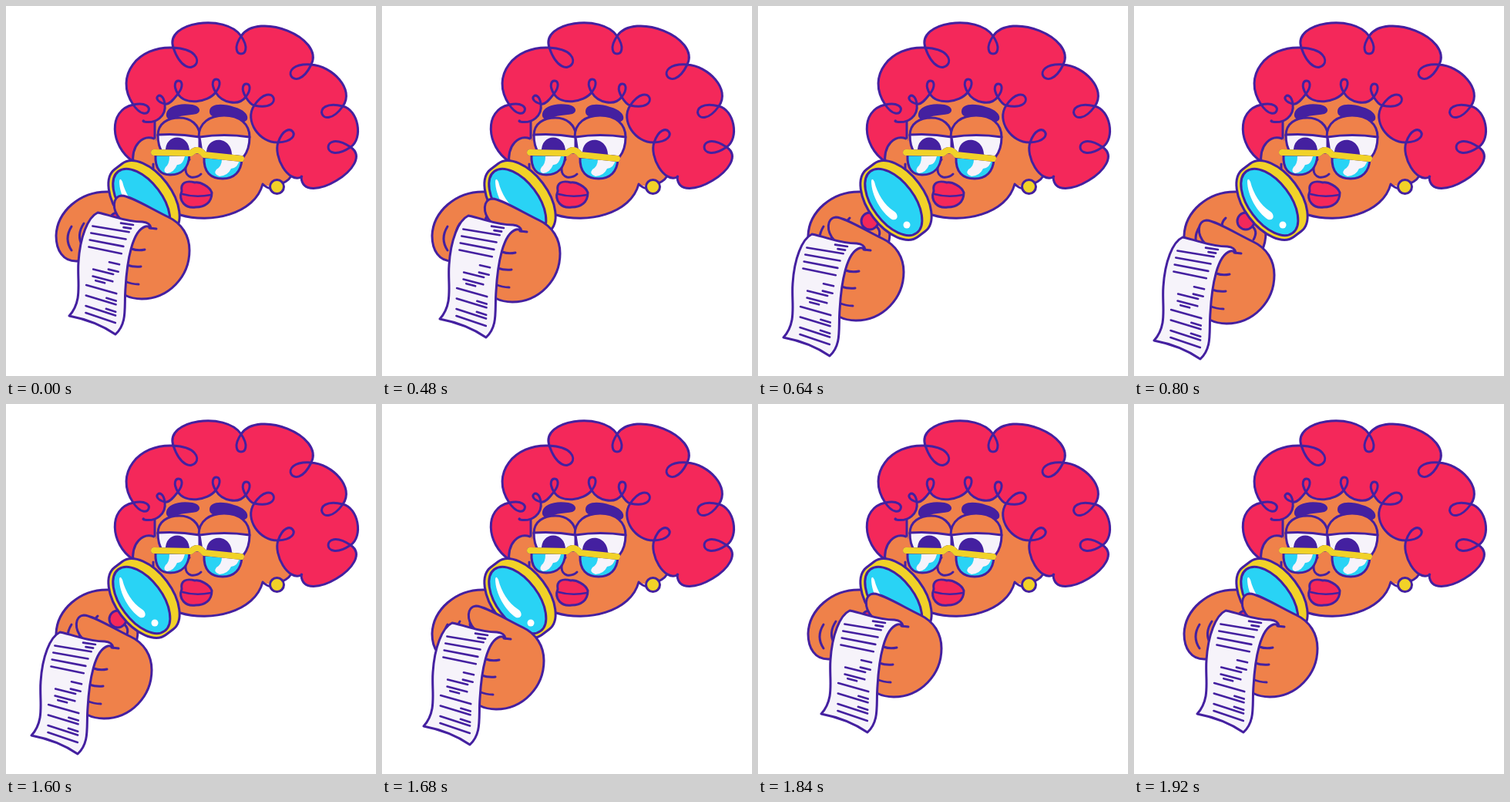
These frames come from a looping animation (480x480 px, 2.24 s). An HTML page:

```html
<!DOCTYPE html>
<html lang="en">
<head>
<meta charset="utf-8">
<title>Reading a receipt</title>
<style>
  html, body { margin: 0; width: 100%; height: 100%; overflow: hidden; background: #fff; }
  svg { display: block; width: 100%; height: 100%; }
  .ink { fill: none; }
  .skin { fill: #ef814a; }
  .hair { fill: #f4285a; }
  .gold { fill: #f1d228; }
  .glass { fill: #29d3f5; }
  .paper { fill: #f6f3fa; }
  .white { fill: #fff; }
  .dark { fill: #4420a0; }
  .flat { stroke: none; }
</style>
</head>
<body>
<svg viewBox="0 0 480 480" stroke="#4420a0" stroke-width="3" stroke-linecap="round" stroke-linejoin="round">
  <g id="head">
    <path class="hair flat" d="M160 132H194V176L164 198Z"/>
    <path class="skin flat" d="M192 110H322L345 165L372 216C368 230 345 238 333 231C325 272 265 283 226 271L192 215Z"/>
    <path class="ink" d="M193 146V174M226 271C265 283 323 270 333 231Q338 236 344 237M358 230Q369 226 371 217"/>
    <path class="hair" id="curls"/>
    <path class="skin flat" d="M194 172C178 167 162 179 165 206L200 225Z"/>
    <path class="ink" d="M192 172C178 167 162 179 165 206M191 205V214"/>
    <circle class="gold" cx="351.500" cy="234.500" r="9"/>

    <path class="dark flat" d="M208 140C209 130 225 125 242 128C252 130 254 137 247 140C236 142 224 142 219 146C213 149 207 146 208 140Z"/>
    <path class="dark flat" d="M264 137C264 126 281 126 296 131C308 134 315 141 313 147C310 153 297 151 288 148C278 144 264 146 264 137Z"/>

    <path class="skin" d="M197 168C197 152 210 145 225 145C240 145 250 154 252 168"/>
    <path class="skin" d="M250 170C250 151 265 142 283 142C303 142 316 153 316 170"/>
    <path class="paper" d="M197 167Q224 165 251 170V190H203Q197 182 197 167Z"/>
    <path class="paper" d="M251 170Q283 165 316 170Q316 186 308 196L254 190Z"/>
    <path class="dark flat" d="M207 190C205 164 239 164 238 190Z"/>
    <path class="dark flat" d="M260 193C258 167 294 167 293 195Z"/>

    <path class="ink" d="M238 199C231 208 231 219 240 222Q248 223 253 218"/>
    <path class="glass" d="M194 193C193 212 201 219 213 219C227 219 237 211 238 193Z"/>
    <path class="glass" d="M257 196C256 216 266 224 281 224C296 224 305 215 306 199Z"/>
    <path class="paper flat" d="M212 195H232Q229 207 222 206Q218 216 209 217Q203 215 207 209Q212 205 212 195Z"/>
    <path class="paper flat" d="M280 199H303Q301 210 292 211Q288 220 277 221Q268 218 273 212Q280 208 280 199Z"/>
    <path class="ink" id="frame" stroke-width="8" d="M192 190L240 191Q249 182 257 193L305 198"/>
    <use href="#frame" style="stroke: #f1d228; stroke-width: 3.500px"/>
    <path class="hair" d="M228 240C226 229 234 226 245 229C252 228 264 234 267 242C267 255 258 261 246 261C233 263 223 253 228 240Z"/>
    <path class="ink" stroke-width="2.500" d="M229 244Q246 249 266 245"/>
  </g>

  <g id="lensHand">
    <path class="skin" d="M135 241C95 239 66 268 65 298C65 317 74 331 91 331L150 330C165 325 171 312 171 293L150 255Z"/>
    <path class="ink" d="M85 286Q75 302 85 317M101 282Q91 297 99 311M119 275Q112 281 115 290M151 284Q162 291 155 303"/>
    <circle class="hair" cx="145" cy="279" r="11"/>
    <g transform="translate(179 252) rotate(53)">
      <path class="gold" d="M-55 -6A55 31 0 0 1 55 -6V6A55 31 0 0 1 -55 6Z"/>
      <ellipse class="glass" cy="4" rx="50" ry="27"/>
    </g>
    <path class="white flat" d="M147 227C147 246 160 268 174 277C182 279 183 270 176 266C164 258 155 244 151 228Q148 222 147 227Z"/>
    <circle class="white flat" cx="193" cy="284" r="4.500"/>
  </g>

  <g id="receipt">
    <path class="skin" d="M148 276C137 264 138 247 150 246C161 246 190 264 211 274C228 282 238 298 238 317C238 351 211 380 176 380Q164 380 154 375L132 320Z"/>
    <path class="ink" d="M186 288L195 289M163 315Q171 318 180 316M157 336Q166 339 175 338M154 357Q163 361 172 361"/>
    <path class="paper" d="M119 268C106 274 96 300 94 332C92 358 100 382 82 402C103 406 123 413 142 426C158 411 153 391 155 366C157 330 164 291 181 286Q185 285 188 288Q187 281 177 280C155 280 139 272 119 268Z"/>
    <path id="print" class="ink" stroke-width="2.600"/>
  </g>
</svg>
<script>
  const draw = (id, d) => document.getElementById(id).setAttribute("d", d);

  // Where hair lobes meet: x, y, curl tip dx, dy, fullness of the lobe before it.
  // A tip of about one unit gives a plain corner.
  const curls = [
    [164, 201, 1, 0, 0], [165, 128, 20, 8, .47], [217, 54, 29, 22, .5],
    [305, 39, 0, 23, .4], [396, 76, -26, 15, .4], [437, 130, -27, 10, .4],
    [447, 183, -29, 0, .38], [383, 222, .6, -1, .55], [353, 177, 19, -14, .35],
    [322, 129, 25, -10, .42], [311, 118, 1, -17, .3], [272, 112, 1, -17, .4],
    [223, 114, 1, -17, .35], [206, 127, -9, -10, .3], [179, 150, -1, -1, .45]
  ].map(([x, y, dx, dy, full]) => ({
    x, y, full,
    into: [dx * 4 / 3 + dy * .9, dy * 4 / 3 - dx * .9],
    out: [dx * 4 / 3 - dy * .9, dy * 4 / 3 + dx * .9]
  }));
  const at = (p, v, k = 1) => `${p.x + v[0] * k} ${p.y + v[1] * k} `;
  const loopAt = p => `C${at(p, p.into)}${at(p, p.out)}${p.x} ${p.y}`;

  // Each lobe continues the line of the curls at both its ends.
  function lobe(a, b) {
    const size = b.full * Math.hypot(b.x - a.x, b.y - a.y);
    const start = at(a, a.out, -size / Math.hypot(...a.out));
    const end = at(b, b.into, -size / Math.hypot(...b.into));
    return `C${start}${end}${b.x} ${b.y}`;
  }
  draw("curls", curls.map((p, i) => i ? lobe(curls[i - 1], p) + loopAt(p) : `M${p.x} ${p.y}`).join(""));

  // Print: long, right, short right, centred and middle strokes, one letter per half row
  const spans = { l: [0, 1], r: [.68, 1], s: [.8, 1], c: [.2, .85], m: [.3, .6] };
  const stroke = (kind, row) => {
    if (!spans[kind]) return "";
    const curve = 12 * Math.exp(-row / 8), left = 103 + curve, width = 38 + curve;
    const slope = .15 + row * .007, y = 276.5 + row * 4.5;
    const [from, to] = spans[kind].map(share => share * width);
    return `M${left + from} ${y + from * slope}L${left + to} ${y + to * slope}`;
  };
  draw("print", [..."rsl.l.l.l..r.rc.cm.l.rl.rl.l"].map(stroke).join(""));

  // The hand goes out and back, each way eased over four ticks of 80 ms.
  const ticks = 28;
  const ease = t => t < .5 ? 2 * t * t : 1 - 2 * (1 - t) ** 2;
  const ramp = (tick, start) => ease(Math.min(1, Math.max(0, (tick - start) / 4)));
  const frames = Array.from({ length: ticks + 1 }, (_, tick) => {
    const share = ramp(tick, 5) - ramp(tick, 19);
    return {
      offset: tick / ticks,
      transform: `translate(${-56 * share}px, ${32 * share}px)`,
      easing: "steps(1, end)"
    };
  });
  document.getElementById("receipt").animate(frames, { duration: ticks * 80, iterations: Infinity });
</script>
</body>
</html>
```
